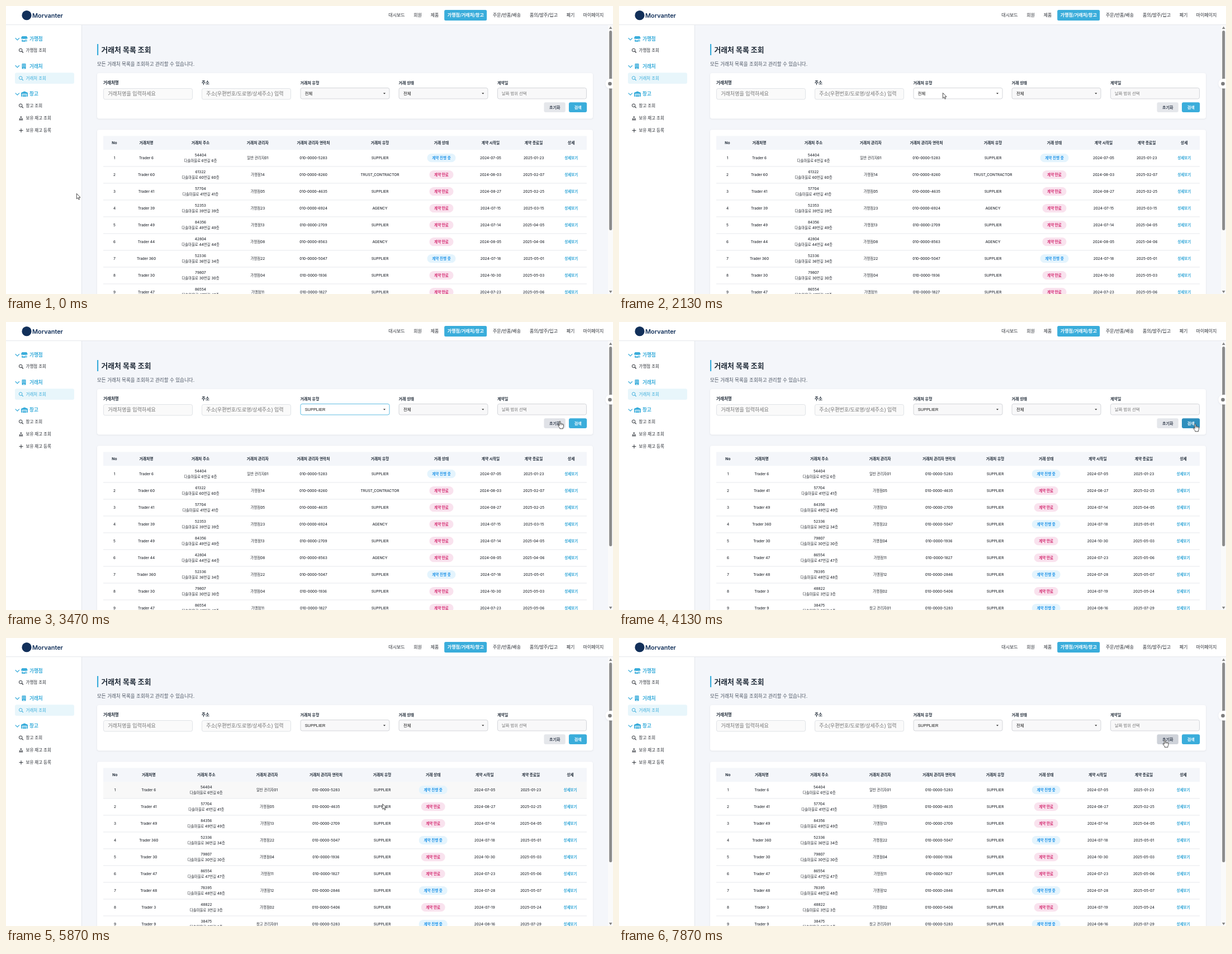
Animation, 1086 px wide and 515 px high, one loop 8000 ms. Source, as an HTML page:

```html
<!DOCTYPE html>
<html lang="ko">
<head>
<meta charset="utf-8">
<title>거래처 목록 조회</title>
<style>
html, body { margin: 0; width: 100%; height: 100%; overflow: hidden; background: #fff; }
svg { display: block; width: 1086px; height: 515px; font-family: Inter, 'Noto Sans CJK KR', 'Noto Sans CJK', sans-serif; }
.native { font-family: 'Liberation Sans', 'Noto Sans CJK KR', 'Noto Sans CJK', sans-serif; }
text { white-space: pre; }
</style>
</head>
<body>
<svg id="stage" viewBox="0 0 1086 515"></svg>
<script>
const TEAL = '#3aaddb', INK = '#1f2a37', BODY = '#2b2f36', LINE = '#e3e6ea';
const stage = document.getElementById('stage');

// ---- markup helpers ----
const rect = (x, y, w, h, fill, r = 0, more = '') =>
  `<rect x="${x}" y="${y}" width="${w}" height="${h}" rx="${r}" fill="${fill}" ${more}/>`;
const path = (d, fill, stroke = 'none', width = 1, more = '') =>
  `<path d="${d}" fill="${fill}" stroke="${stroke}" stroke-width="${width}" ${more}/>`;
const text = (s, x, cy, size, fill = BODY, weight = 500, anchor = 'start', more = '') =>
  `<text x="${x}" y="${(cy + size * 0.37).toFixed(2)}" font-size="${size}" fill="${fill}" font-weight="${weight}" text-anchor="${anchor}" ${more}>${s}</text>`;
const mid = (s, x, cy, size, fill, weight) => text(s, x, cy, size, fill, weight, 'middle');
const native = (s, x, cy, size, fill = '#111', more = '') =>
  text(s, x, cy, size, fill, 400, 'start', `class="native" ${more}`);
const group = (id, inner) => `<g id="${id}">${inner}</g>`;

// ---- header ----
function header() {
  const nav = [['대시보드', 699], ['회원', 736.5], ['제품', 767], ['가맹점/거래처/창고', 822.3],
    ['주문/반품/배송', 896], ['품의/발주/입고', 962], ['폐기', 1010], ['마이페이지', 1051]];
  return rect(0, 0, 1086, 33.5, '#fff') + rect(0, 33, 1086, 1, '#e6e8ec') +
    '<circle cx="37" cy="16.7" r="8.6" fill="#12305a"/>' +
    text('Morvanter', 47, 16.8, 10.9, '#12305a', 600) +
    rect(784.2, 7, 76, 19, TEAL, 2.5) +
    nav.map(([s, x], i) => mid(s, x, 16.3, 8, i === 3 ? '#fff' : BODY, i === 3 ? 600 : 500)).join('');
}

// ---- sidebar ----
const lens = (y, c) => `<circle cx="26.2" cy="${y - .6}" r="2.8" fill="none" stroke="${c}"/>` +
  path(`M28.3 ${y + 1.5}l2.5 2.5`, 'none', c, 1.2);
function sidebar() {
  const heads = [['가맹점', 58.7], ['거래처', 107.7], ['창고', 157]];
  const items = [['가맹점 조회', 79.5], ['거래처 조회', 129.2, TEAL], ['창고 조회', 178.4],
    ['보유 재고 조회', 200.6], ['보유 재고 등록', 222.6]];
  const cube = (x, y) => rect(x, y, 2.2, 2.2, BODY, .4);
  return rect(0, 34, 135, 481, '#fff') + rect(135, 34, 1, 481, '#e3e6eb') +
    rect(16, 119.3, 106, 19.8, '#e8f6fb', 3) +
    heads.map(([s, y]) => path(`M16.7 ${y - 1.4}l3.6 3.6l3.6 -3.6`, 'none', TEAL, 1.3) +
      text(s, 42, y - .2, 8.6, TEAL, 700)).join('') +
    items.map(([s, y, c = BODY]) => text(s, 35.5, y, 7.5, c)).join('') +
    lens(79.5, BODY) + lens(129.2, TEAL) + lens(178.4, BODY) +
    // shop, building, warehouse
    path('M28.6 54H37L38.8 57.5Q37.5 59.3 35.6 58.5Q34 59.5 32.8 58.5Q31 59.5 29.8 58.5Q28 59.2 26.8 57.5ZM28.2 60H29.6V61.5H34V60H35.2V63.8H28.2ZM36.2 60H37.4V63.8H36.2Z', TEAL) +
    rect(28.5, 103, 7, 9.5, TEAL, .8) +
    path('M29.9 105.1h1.4M32.7 105.1h1.4M29.9 107.7h1.4M32.7 107.7h1.4', 'none', '#fff', 1.2) +
    rect(31.3, 110.3, 1.4, 2.2, '#fff') +
    path('M27 162V155.6Q27 155 27.6 154.7L33 152.5L38.4 154.7Q39 155 39 155.6V162H37.3V157H28.7V162ZM29.5 157.9H36.5V159.2H29.5ZM29.5 160.1H36.5V162H29.5Z', TEAL) +
    cube(25.7, 197.6) + cube(24, 201) + cube(27.4, 201) + rect(23.3, 203.6, 7, .8, BODY) +
    path('M23.5 222.6h7M27 219.1v7', 'none', BODY, 1);
}

// ---- search card ----
const caret = x => path(`M${x - 2} 155.4h4l-2 2.2Z`, '#111');
const field = (x, y, bg, border, id = '') =>
  rect(x + .5, y + .5, 159, 19.5, bg, 3, `stroke="${border}" stroke-width=".8" ${id && `id="${id}"`}`);
function searchCard() {
  const label = (s, x, size) => text(s, x, 137.3, size, INK, 600);
  return rect(163, 68, 2.2, 20, TEAL) + text('거래처 목록 조회', 170.4, 77.8, 12.9, INK, 700) +
    text('모든 거래처 목록을 조회하고 관리할 수 있습니다.', 163, 103.5, 8.55, '#4b5563', 400) +
    rect(163, 120, 887, 81.3, '#fff', 4, 'filter="url(#soft)"') +
    label('거래처명', 174, 7.55) + label('주소', 350, 7.55) +
    label('거래처 유형', 526.5, 7) + label('거래 상태', 702.5, 7) + label('계약일', 879, 7) +
    field(174, 147, '#fafafa', '#d9dce1') + field(350, 147, '#fafafa', '#d9dce1') +
    native('거래처명을 입력하세요', 182.2, 156.8, 9.05, '#757575') +
    native('주소(우편번호/도로명/상세주소) 입력', 358.2, 156.8, 9.05, '#757575') +
    field(526.5, 146, '#f8f8f9', '#c9ccd1', 'kindBox') + field(702.5, 146, '#f8f8f9', '#c9ccd1') +
    field(879, 146, '#f8f8f9', '#c9ccd1') +
    native('전체', 534.7, 156.3, 7.35, '#111', 'id="kindAll"') +
    native('SUPPLIER', 534.7, 156.3, 7.4, '#111', 'id="kindSupplier"') +
    native('전체', 711, 156.3, 7.35) +
    native('날짜 범위 선택', 887, 156.3, 7.35, '#757575') +
    caret(677) + caret(853.3) +
    rect(962.5, 172.2, 38.3, 17.9, '#e5e7eb', 3, 'id="reset"') + mid('초기화', 981.8, 181.4, 7.1, '#374151', 600) +
    rect(1007, 172.2, 32.2, 17.9, TEAL, 3, 'id="search"') + mid('검색', 1023.2, 181.4, 7.1, '#fff', 600);
}

// ---- table ----
const HEADS = ['No', '거래처명', '거래처 주소', '거래처 관리자', '거래처 관리자 연락처', '거래처 유형',
  '거래 상태', '계약 시작일', '계약 종료일', '상세'];
const S = 'SUPPLIER', A = 'AGENCY';
// id, post code, manager, phone end, type, running, start, end
const DATA = [
  [6, '54404', '일반 관리자01', '5283', S, 1, '07-05', '01-23'],
  [60, '61322', '가맹점14', '8260', 'TRUST_CONTRACTOR', 0, '08-03', '02-07'],
  [41, '57704', '가맹점05', '4635', S, 0, '08-27', '02-25'],
  [39, '52353', '가맹점23', '6924', A, 0, '07-15', '03-15'],
  [49, '84356', '가맹점13', '2709', S, 0, '07-14', '04-05'],
  [44, '42804', '가맹점08', '8563', A, 0, '08-05', '04-06'],
  [360, '52336', '가맹점22', '5047', S, 1, '07-18', '05-01'],
  [30, '79807', '가맹점04', '1936', S, 0, '10-30', '05-03'],
  [47, '86554', '가맹점11', '1827', S, 0, '07-23', '05-06'],
  [48, '78395', '가맹점12', '2846', S, 1, '07-28', '05-07'],
  [3, '48822', '가맹점02', '5406', S, 0, '07-19', '05-24'],
  [9, '38475', '창고 관리자01', '5283', S, 1, '08-16', '07-29']
];
const rowTop = i => 257.2 + 30 * i;

function table(rows, cols) {
  const cell = (s, c, y) => mid(s, cols[c], y, 6.45, BODY, 500);
  return HEADS.map((s, i) => mid(s, cols[i], 244.6, 6.75, INK, 700)).join('') +
    rows.map(([id, zip, boss, tel, type, live, from, to], i) => {
      const y = 271.8 + 30 * i, w = live ? 51 : 43;
      const place = id > 99 ? '36번길 34층' : `${id}번길 ${id}층`;
      return cell(i + 1, 0, y) + cell(`Trader ${id}`, 1, y) +
        cell(zip, 2, y - 4.8) + cell(`다솔마을로 ${place}`, 2, y + 5) +
        cell(boss, 3, y) + cell(`010-0000-${tel}`, 4, y) + cell(type, 5, y) +
        rect(cols[6] - w / 2, y - 7.7, w, 15.2, live ? '#e4f4fd' : '#f9e2ee', 7.6) +
        mid(live ? '계약 진행 중' : '계약 만료', cols[6], y - .4, 6.6, live ? '#1e93e8' : '#d42a70', 700) +
        cell(`2024-${from}`, 7, y) + cell(`2025-${to}`, 8, y) +
        mid('상세보기', cols[9], y, 6.45, '#2ba3d6', 700);
    }).join('');
}

function tableCard() {
  const lines = DATA.slice(0, 9).map((_, i) => rect(174, rowTop(i + 1) - .7, 865, .9, LINE)).join('');
  return rect(163, 221.3, 887, 310, '#fff', 4, 'filter="url(#soft)"') +
    rect(174, 232.4, 865, 24.8, '#f4f6fa') +
    rect(174, 0, 865, 29.4, '#f8f8f8', 0, 'id="hoverRow"') + lines +
    group('allRows', table(DATA.slice(0, 9), [194, 251, 348, 450.3, 550, 669, 779, 867, 944.2, 1011.3])) +
    group('supplierRows', table(DATA.filter(r => r[4] === S), [195, 255.3, 358.3, 467, 572.5, 673, 764.2, 856.4, 939, 1009.6]));
}

// ---- overlays ----
function dropdown() {
  const names = ['전체', S, 'TRUST_CONTRACTOR', 'LOGISTICS', A];
  return rect(527, 167, 159.5, 70.5, '#fff', 0, 'stroke="#767676" stroke-width=".9"') +
    rect(527.4, 167.5, 158.7, 14.6, '#1967d2', 0, 'id="pick"') +
    names.map((s, i) => native(s, 534.7, 175.6 + 13.7 * i, 7.35, '#111', `id="opt${i}"`)).join('');
}
const scrollbar = () => rect(1077, 34, 9, 481, '#fafafa') +
  path('M1081.7 36.6l2.8 4.4h-5.6ZM1081.7 513.4l2.8 -4.4h-5.6Z', '#858585') +
  rect(1079.2, 44, 5, 357, '#8b8b8b', 2.5) +
  rect(1072.5, 130, 20, 17.6, '#fff', 8.8, 'filter="url(#soft)"') +
  '<circle cx="1080.5" cy="139" r="3.3" fill="#7d7d7d"/>';

const ARROW = 'M.4 .4V9.9L2.6 7.9L4.1 11.3L5.6 10.6L4.1 7.3H7Z';
const HAND = 'M-1 1.1Q0 -.5 1 1.1V5.2L1.3 4.5Q2.5 4 3 5.2Q4.2 4.3 4.8 5.7Q6 5 6.5 6.4V9.5Q6.3 11 5.5 12V13.8H-.2V12.4Q-2 10.6 -3.3 8.2Q-3.5 6.8 -2.2 7.2L-1 8.5Z';

stage.innerHTML =
  `<defs><filter id="soft" x="-5%" y="-20%" width="110%" height="140%"><feDropShadow dx="0" dy=".8" stdDeviation="1.4" flood-color="#223" flood-opacity=".09"/></filter></defs>` +
  rect(135, 33, 951, 482, '#f4f6fa') + searchCard() + tableCard() + header() + sidebar() + scrollbar() +
  group('menu', dropdown()) +
  group('arrow', path(ARROW, '#fff', '#222', .8, 'stroke-linejoin="round"')) +
  group('hand', path(HAND, '#fff', '#222', .8, 'stroke-linejoin="round"') +
    path('M1.1 5.2V7.5M3 5.4V7.5M4.8 6V7.6', 'none', '#222', .6));

// ---- motion ----
const TRACK = [
  [600, 126, 335], [760, 330, 262], [920, 790, 196], [1050, 1000, 178], [1190, 740, 160], [1330, 579, 155],
  [2470, 579, 155], [2730, 576, 182], [2930, 575, 189], [3200, 575, 189], [3300, 690, 187],
  [3470, 991, 177], [3610, 1036, 183], [3870, 1031, 182], [4740, 1031, 182], [4800, 1029.5, 181.5],
  [4870, 1025, 182], [5410, 1025, 182], [5620, 930, 222], [6000, 540, 335], [6270, 239, 419],
  [6330, 239, 419], [6410, 300, 427], [6670, 725, 299.5], [6860, 946, 252], [7130, 658, 234],
  [7200, 658, 234], [7500, 830, 212], [7740, 965, 185], [7870, 976.5, 181.5]
];
function pointer(t) {
  const i = TRACK.findIndex(k => k[0] > t);
  if (i === 0) return TRACK[0].slice(1);
  if (i < 0) return TRACK[TRACK.length - 1].slice(1);
  const [a, x, y] = TRACK[i - 1], [b, u, v] = TRACK[i], p = (t - a) / (b - a);
  return [x + (u - x) * p, y + (v - y) * p];
}
const inside = ([x, y], l, r, top = 172.4, bottom = 190) => x >= l && x <= r && y >= top && y <= bottom;
const overReset = p => inside(p, 962.5, 1001);
const overSearch = p => inside(p, 1007, 1039);
// share of the last 150 ms spent inside a region, as a CSS-like fade
function fade(t, test) {
  let n = 0;
  for (let i = 0; i < 10; i++) n += test(pointer(t - i * 15)) ? 1 : 0;
  return n / 10;
}
const mix = (a, b, p) => `rgb(${a.map((v, i) => Math.round(v + (b[i] - v) * p))})`;

const el = {};
stage.querySelectorAll('[id]').forEach(n => el[n.id] = n);
const set = (id, key, value) => el[id].setAttribute(key, value);
const show = (id, on) => set(id, 'visibility', on ? 'visible' : 'hidden');

function draw(t) {
  const at = pointer(t), open = t >= 2200 && t < 3200, chosen = t >= 3200, filtered = t >= 4130;
  const focus = t >= 2200 && t < 4100;
  const onKind = p => inside(p, 526.5, 686.5, 146, 166);
  set('kindBox', 'stroke', focus ? TEAL : '#c9ccd1');
  set('kindBox', 'fill', focus ? '#fff' : mix([248, 248, 249], [255, 255, 255], fade(t, onKind)));
  show('kindAll', !chosen);
  show('kindSupplier', chosen);
  show('allRows', !filtered);
  show('supplierRows', filtered);

  show('menu', open);
  const second = t >= 2800;
  set('pick', 'y', second ? 182.1 : 167.5);
  set('pick', 'height', second ? 13.8 : 14.6);
  set('opt0', 'fill', second ? '#111' : '#fff');
  set('opt1', 'fill', second ? '#fff' : '#111');

  set('reset', 'fill', mix([229, 231, 235], [203, 208, 215], fade(t, overReset)));
  set('search', 'fill', mix([58, 173, 219], [47, 143, 189], fade(t, overSearch)));

  const [hx, hy] = pointer(t - 70), row = Math.floor((hy - rowTop(0)) / 30);
  show('hoverRow', hx > 174 && hx < 1039 && row >= 0);
  set('hoverRow', 'y', rowTop(Math.max(row, 0)));

  const click = overReset(at) || overSearch(at);
  show('arrow', !click);
  show('hand', click);
  for (const id of ['arrow', 'hand']) set(id, 'transform', `translate(${at[0].toFixed(2)} ${at[1].toFixed(2)})`);
}

const STEP = 1000 / 15;
const stepped = t => Math.round(Math.floor((t + 10) / STEP) * STEP / 10) * 10;

const start = performance.now();
function tick(now) {
  draw(stepped(Math.max(0, now - start) % 8000));
  requestAnimationFrame(tick);
}
draw(0);
requestAnimationFrame(tick);
</script>
</body>
</html>
```
